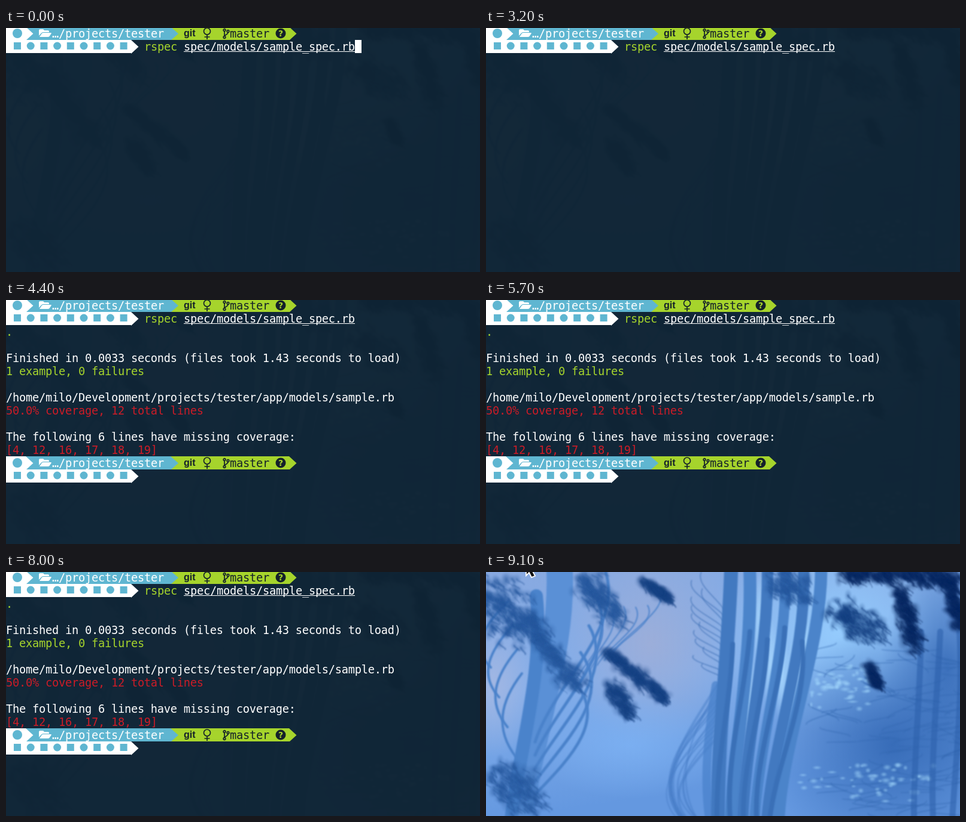
Write an HTML page with a canvas that moves like this. It is 792 by 409 pixels and loops after 9.2 s.

```html
<!DOCTYPE html>
<html lang="en">
<head>
<meta charset="utf-8">
<title>Coverage report in a terminal</title>
<style>
html, body { margin: 0; width: 100%; height: 100%; overflow: hidden; background: #5f97d8; }
canvas, svg { position: absolute; left: 0; top: 0; }
text { font: 18.667px "DejaVu Sans Mono", monospace; letter-spacing: -.238px; fill: #fff; }
.green { fill: #a6d42c; }
.red { fill: #cb1c27; }
.blue { fill: #5fb6d1; }
.dark { fill: #14202a; }
.line { fill: none; stroke: #14202a; stroke-width: 1.7; }
.git { font: bold 16px "Liberation Sans", sans-serif; letter-spacing: 0; }
.help { font: bold 14px "DejaVu Sans", sans-serif; letter-spacing: 0; text-anchor: middle; }
</style>
</head>
<body>
<canvas id="forest" width="792" height="409"></canvas>
<svg width="792" height="409" viewBox="0 0 792 409">
  <g id="terminal">
    <rect width="792" height="409" fill="rgb(15,36,51)" opacity=".97"/>
    <g id="prompt">
      <path class="green" d="M275-2H473L485.500 9.500 474 20H275z"/>
      <path class="blue" d="M33-2H275L288 9.500 276 20H33z"/>
      <path fill="#fff" d="M0-2H33L45.500 9.500 34 20H209L221.500 31.500 209 43V42H0z"/>
      <circle class="blue" cx="19" cy="9" r="8"/>
      <path fill="#fff" d="M55 13V4q0-2 2-2h5l2 2h6q2 0 2 2v1H62q-2 0-3 1.500z M56 15l4-6q1-1 2-1h13q1.500 0 .5 1.500l-3 4.500q-1 1-2 1z"/>
      <text x="77" y="16">…/projects/tester</text>
      <text class="git dark" x="297" y="14">git</text>
      <path class="line" d="M341.500 5.500a5.500 5.500 0 1 0-11 0a5.500 5.500 0 1 0 11 0M336 11V19M331.500 15h9"/>
      <path class="line" d="M365 5V14M371 7q0 3-6 6"/>
      <g class="line"><circle cx="365" cy="3.500" r="1.800"/><circle cx="365" cy="15.500" r="1.800"/><circle cx="371" cy="5.500" r="1.800"/></g>
      <text class="dark" x="374" y="16">master</text>
      <circle class="dark" cx="459" cy="9" r="8.500"/>
      <text class="help green" x="459" y="14">?</text>
      <g id="icons" class="blue"></g>
    </g>
    <text class="green" x="231" y="38">rspec</text>
    <text x="297" y="38">spec/models/sample_spec.rb</text>
    <rect x="297" y="39" width="286" height="1" fill="#fff"/>
    <g id="report">
      <text class="green" y="60">.</text>
      <text y="104">Finished in 0.0033 seconds (files took 1.43 seconds to load)</text>
      <text class="green" y="126">1 example, 0 failures</text>
      <text y="170">/home/milo/Development/projects/tester/app/models/sample.rb</text>
      <text class="red" y="192">50.0% coverage, 12 total lines</text>
      <text y="236">The following 6 lines have missing coverage:</text>
      <text class="red" y="258">[4, 12, 16, 17, 18, 19]</text>
    </g>
    <use id="prompt2" href="#prompt" y="264"/>
    <rect id="caret" width="11" height="22" fill="#fff"/>
  </g>
  <path id="pointer" d="M67-17V6L72 1 76 9 82 6.500 78-1H85z" fill="#111" stroke="#fff" stroke-width="1.800"/>
</svg>
<script>
const LOOP = 9200;
const $ = id => document.getElementById(id);
const show = (id, on) => $(id).style.display = on ? "" : "none";
const move = (id, x, y) => $(id).setAttribute("transform", `translate(${x} ${y})`);

// Badges in the second prompt row, alternating squares and circles
$("icons").innerHTML = Array.from({ length: 9 }, (_, i) => {
  const x = 19 + i * 22.2;
  return i % 2 ? `<circle cx="${x}" cy="30" r="6.500"/>`
               : `<rect x="${x - 6}" y="24" width="12" height="12"/>`;
}).join("");

const ctx = $("forest").getContext("2d");
let seed = 11;
const rnd = () => (seed = seed * 16807 % 2147483647) / 2147483647;
const spread = r => (rnd() + rnd() - 1) * r;
const repeat = (n, fn) => { for (let i = 0; i < n; i++) fn(i); };

function glow(x, y, rx, ry, rgb, alpha) {
  ctx.save();
  ctx.translate(x, y);
  ctx.scale(rx, ry);
  const g = ctx.createRadialGradient(0, 0, 0, 0, 0, 1);
  g.addColorStop(0, `rgba(${rgb},${alpha})`);
  g.addColorStop(1, `rgba(${rgb},0)`);
  ctx.fillStyle = g;
  ctx.fillRect(-1, -1, 2, 2);
  ctx.restore();
}

// A branch from (x1,y1) to (x2,y2) that bows sideways by `bow`
function limb(color, width, x1, y1, x2, y2, bow = 0) {
  const h = (y2 - y1) / 3;
  ctx.strokeStyle = color;
  ctx.lineWidth = width;
  ctx.beginPath();
  ctx.moveTo(x1, y1);
  ctx.bezierCurveTo(x1 + bow, y1 + h, x2 + bow, y2 - h, x2, y2);
  ctx.stroke();
}

// Smudged needles scattered along a line
function bough(rgb, x1, y1, x2, y2, r) {
  const count = (Math.hypot(x2 - x1, y2 - y1) + r) * 1.2;
  repeat(count, () => {
    const k = rnd(), x = x1 + (x2 - x1) * k + spread(r), y = y1 + (y2 - y1) * k + spread(r);
    glow(x, y, 5 + rnd() * 9, 5 + rnd() * 9, rgb, .4);
    limb(`rgba(${rgb},.5)`, 1 + rnd() * 2, x, y, x + 4 + rnd() * 9, y + 4 + rnd() * 9);
  });
}

function paintForest() {
  const sky = ctx.createLinearGradient(0, 0, 60, 409);
  sky.addColorStop(0, "#88a9e0");
  sky.addColorStop(.5, "#83aeea");
  sky.addColorStop(1, "#6498e0");
  ctx.fillStyle = sky;
  ctx.fillRect(0, 0, 792, 409);
  glow(275, 120, 150, 170, "158,174,216", .9);
  glow(10, 190, 80, 120, "166,184,226", .9);
  glow(240, 290, 170, 90, "126,180,246", .7);
  glow(590, 100, 220, 170, "150,206,255", .9);

  // Hazy trees on the right
  glow(680, 290, 210, 200, "55,108,184", 1);
  glow(770, 160, 110, 200, "55,108,184", .9);
  ctx.lineCap = "round";
  ctx.filter = "blur(1px)";
  repeat(110, () => {
    const x = 535 + rnd() * 250, y = 130 + rnd() * 280;
    limb("rgba(50,103,176,.4)", 2, x, y, x + 50, y + spread(40));
  });
  repeat(110, i => {
    const low = i % 2;
    glow((low ? 650 : 595) + spread(low ? 140 : 70), (low ? 350 : 190) + spread(40), 3 + rnd() * 8, 2 + rnd() * 4, "165,218,255", .6);
  });
  repeat(3, i => limb("rgba(45,98,172,.6)", 10, 727 + i * 32, 100, 715 + i * 32, 415, spread(8)));

  // Left tree
  limb("#5a90d6", 44, 122, -20, 56, 430, 12);
  limb("#4a83cb", 22, 84, 40, 40, 430, 14);
  repeat(5, i => limb("#4a82ca", 5, 200 - i * 14, i * 45, 82, 285 + i * 22, 30 + i * 8));
  repeat(4, i => limb("#4a82ca", 4, 60 - i * 8, 170 - i * 40, 50 - i * 14, 310 - i * 50, -36));
  repeat(6, i => limb("#5085cc", 2, 150 + i * 12, 180 - i * 8, 190 + i * 20, 50 + spread(50), 18));

  // Fine branches beside the central group
  repeat(12, i => {
    const x = 320 + rnd() * 40;
    limb("rgba(72,126,200,.5)", 1.5 + rnd() * 3, 386, 190 + i * 8, x, 415, -40 - rnd() * 20);
    limb("rgba(62,112,182,.7)", 1.5, 402, 70 + i * 10, 338 + rnd() * 30, i * 14, -10);
  });
  limb("rgba(72,128,202,.7)", 14, 384, 190, 374, 420, -12);

  // Central trunks, light between them
  repeat(6, i => glow(440 + i * 18, 150 + spread(90), 14, 80, "170,218,255", .8));
  repeat(6, i => limb(i % 2 ? "#4b84ca" : "#4279c0", 17 + rnd() * 9, 410 + i * 30, -20, 388 + i * 20, 430, spread(14) + 4));
  repeat(5, i => limb("#3a70b7", 8, 412 + i * 29, 40 + rnd() * 90, 386 + i * 22, 415, spread(24)));

  // Boughs, hazy then near
  const haze = "40,90,160", mid = "24,68,134", near = "10,42,100";
  bough(haze, 0, 30, 60, 90, 50);
  bough(haze, 60, 70, 150, 190, 22);
  bough(haze, 160, 10, 215, 75, 28);
  bough(haze, 20, 345, 75, 375, 45);
  bough(haze, 480, 10, 525, 40, 30);
  bough(mid, 260, 15, 305, 42, 8);
  bough(mid, 205, 135, 300, 212, 12);
  bough(mid, 208, 190, 240, 240, 16);
  bough(mid, 585, 65, 650, 105, 32);
  bough(near, 600, 0, 780, 10, 22);
  bough(near, 690, 30, 715, 125, 18);
  bough(near, 640, 155, 655, 190, 8);
  bough(near, 770, 10, 790, 90, 14);
}
paintForest();

// The caret starts lit and flips at each of these times
const FLIPS = [600, 1200, 1800, 2400, 3200, 3800, 4400, 5000, 5700, 6200, 6800, 7400, 8000, 8600];

function draw() {
  const t = performance.now() % LOOP;
  show("terminal", t < 9100);
  show("report", t >= 4300);
  show("prompt2", t >= 4400);

  const [x, y] = t < 3800 ? [583, 20] : t < 4300 ? [0, 42] : t < 4400 ? [0, 262] : [231, 284];
  move("caret", x, y);
  show("caret", FLIPS.filter(f => f <= t).length % 2 === 0);

  const far = t >= 7000 && t < 7100 || t >= 8800 && t < 8900;
  show("pointer", t >= 6900 && t < 7100 || t >= 8800);
  move("pointer", far ? 8 : 0, far ? 6 : 0);
  requestAnimationFrame(draw);
}
draw();
</script>
</body>
</html>
```
